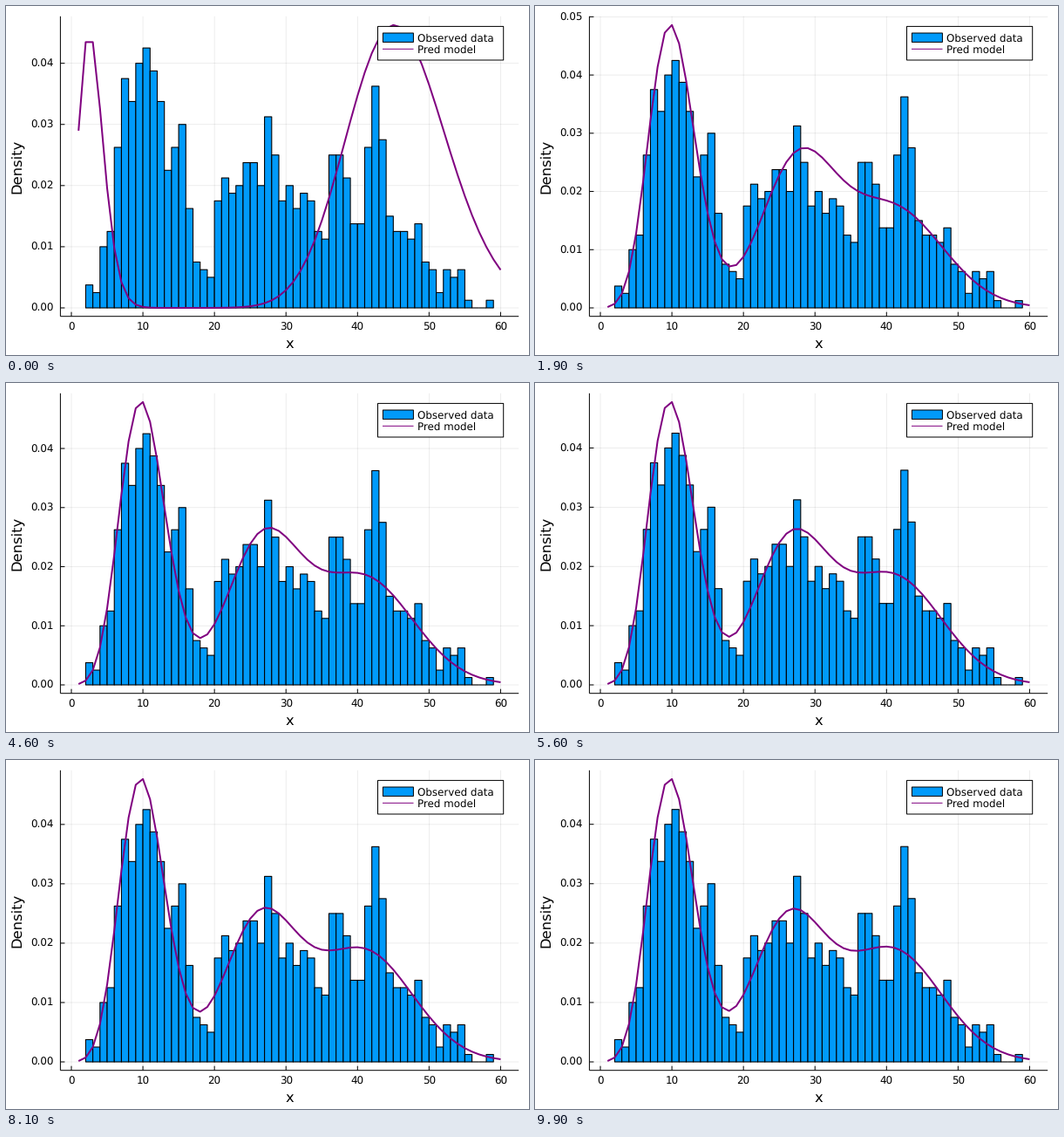
Animation of 600 by 400 pixels, one loop 10000 ms. Source, as a matplotlib script:

```python
import math

import matplotlib.pyplot as plt
import numpy as np
from matplotlib.animation import FuncAnimation
from matplotlib.collections import PolyCollection
from matplotlib.patches import Rectangle

W, H, DPI = 600, 400, 100
FRAMES, INTERVAL = 100, 100
LEFT, RIGHT, TOP, BOTTOM = 62.4, 588.2, 11.8, 355.7
X0, X_UNIT = 75.0, 8.207
BASE, SPAN = 346.0, 324.2
BLUE, PURPLE = "#009afa", "purple"

# The observed sample: how often each value from 2 up occurs.
COUNTS = np.array([
    3, 2, 8, 10, 21, 30, 27, 32, 34, 31, 27, 18, 21, 24, 13, 6, 5, 4, 14,
    17, 15, 16, 19, 19, 16, 25, 20, 14, 16, 13, 15, 14, 10, 9, 20, 20, 17,
    11, 11, 21, 29, 22, 12, 10, 10, 9, 11, 6, 5, 2, 5, 4, 5, 1, 0, 0, 1])
DENSITY = COUNTS / COUNTS.sum()
BINS = np.arange(2, 2 + len(COUNTS))
XS = np.arange(1, 61)
LOG_FACT = np.array([math.lgamma(x + 1) for x in XS])


def settle(step, start, end, drift, tau):
    """Jump from start to end + drift, then ease slowly to end."""
    jump = (start - end - drift) * math.exp(-1.5 * step)
    return end + drift * math.exp(-step / tau) + jump


def poisson(rate):
    return np.exp(XS * np.log(rate) - rate - LOG_FACT)


def mixture(step):
    w1 = settle(step, .194, .381, .0225, 20)
    w2 = settle(step, .720, .317, .045, 45)
    return (w1 * poisson(settle(step, 3.0, 10.2, .2, 20))
            + w2 * poisson(settle(step, 45.2, 26.9, 2.5, 35))
            + (1 - w1 - w2) * poisson(settle(step, 51.0, 41.65, .6, 35)))


def px(x):
    return X0 + X_UNIT * x


def pt(pixels):
    return pixels * 72 / DPI


plt.rcParams["font.family"] = "DejaVu Sans"
plt.rcParams["text.hinting"] = "none"
fig = plt.figure(figsize=(W / DPI, H / DPI), dpi=DPI, facecolor="white")
ax = fig.add_axes([0, 0, 1, 1])
ax.set_xlim(0, W)
ax.set_ylim(H, 0)
ax.axis("off")


def stroke(xs, ys, width=1.0, color="black", z=1.0, alpha=1.0):
    line, = ax.plot(xs, ys, color=color, lw=pt(width), alpha=alpha, zorder=z,
                    solid_capstyle="butt", solid_joinstyle="round", snap=False)
    return line


def label(x, y, text, size=11.9, ha="center", **kw):
    return ax.text(x, y, text, fontsize=pt(size), ha=ha, va="baseline", **kw)


def box(x, y, w, h, fill, z):
    ax.add_patch(Rectangle((x, y), w, h, fc=fill, ec="black", lw=pt(1),
                           zorder=z, snap=False))


# Fixed axes
for v in range(0, 61, 10):
    stroke([px(v)] * 2, [TOP, BOTTOM], alpha=.1, width=.7)
    stroke([px(v)] * 2, [BOTTOM, BOTTOM - 5], z=4)
    label(px(v), 372, str(v))
stroke([LEFT, RIGHT], [BOTTOM] * 2, z=4)
stroke([LEFT] * 2, [TOP, BOTTOM], z=4)
label(325.3, 392, "x", 16.4)
label(16.6, 184, "Density", 16.4, rotation=90, rotation_mode="anchor")

# Parts that follow the vertical scale
ticks = []
for k in range(6):
    grid = stroke([LEFT, RIGHT], [0, 0], alpha=.1, width=.7)
    mark = stroke([LEFT, LEFT + 5], [0, 0], z=4)
    ticks.append((k / 100, grid, mark, label(54.8, 0, f"{k / 100:.2f}", ha="right")))
bars = PolyCollection([], facecolors=BLUE, edgecolors="black",
                      linewidths=pt(1.1), zorder=2, snap=False)
ax.add_collection(bars, autolim=False)
curve = stroke(px(XS), np.zeros(len(XS)), width=2, color=PURPLE, z=3)

# Legend
box(426.5, 23.4, 144.2, 38.6, "white", 6)
box(432.4, 31, 35, 10.4, BLUE, 7)
stroke([432, 467.5], [49.3] * 2, color=PURPLE, z=7)
label(472.2, 41, "Observed data", ha="left", zorder=7)
label(472.2, 53.8, "Pred model", ha="left", zorder=7)


def update(step):
    model = mixture(step)
    peak = max(model.max(), DENSITY.max())

    def py(v):
        return BASE - SPAN * v / peak

    curve.set_ydata(py(model))
    bars.set_verts([[(px(b), BASE), (px(b), y), (px(b + 1), y), (px(b + 1), BASE)]
                    for b, y in zip(BINS, py(DENSITY))])
    for v, grid, mark, text in ticks:
        y = py(v)
        for line in (grid, mark):
            line.set_ydata([y, y])
        text.set_y(y + 4.3)
        for part in (grid, mark, text):
            part.set_visible(y >= TOP)
    return []


anim = FuncAnimation(fig, update, frames=FRAMES, interval=INTERVAL,
                     repeat=True, repeat_delay=0, blit=False)
plt.show()
```
